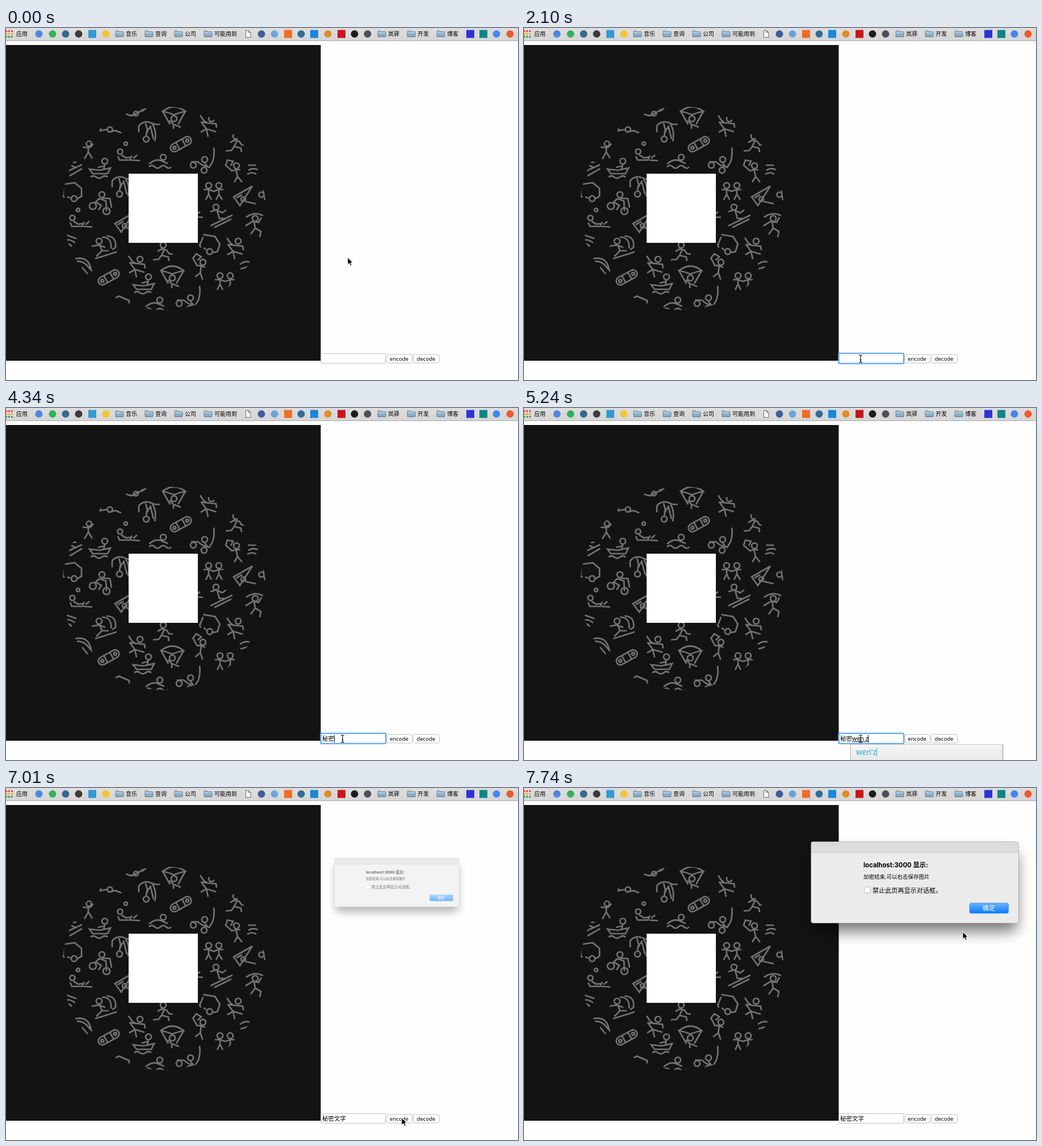
Recreate the animation shown at these times as an HTML page. Size 902 by 621 pixels, loop 8000 ms.

```html
<!DOCTYPE html>
<html lang="zh">
<head>
<meta charset="utf-8">
<style>
html, body { margin: 0; width: 100%; height: 100%; overflow: hidden; background: #fefefe; }
svg { display: block; width: 902px; height: 621px; }
text { font-family: "Noto Sans", "Noto Sans CJK SC", "Noto Sans CJK", sans-serif; white-space: pre; }
</style>
</head>
<body>
<svg viewBox="0 0 902 621">
  <defs>
    <linearGradient id="bar" x2="0" y2="1"><stop stop-color="#dedede"/><stop offset="1" stop-color="#d5d5d5"/></linearGradient>
    <linearGradient id="popFill" x2="0" y2="1"><stop stop-color="#f6f6f6"/><stop offset="1" stop-color="#e2e2e2"/></linearGradient>
    <linearGradient id="blue" x2="0" y2="1"><stop stop-color="#6bb3fa"/><stop offset="1" stop-color="#0a7bfd"/></linearGradient>
    <linearGradient id="folderFill" x2="0" y2="1"><stop stop-color="#a5c4d8"/><stop offset="1" stop-color="#7fa4be"/></linearGradient>
    <clipPath id="disc"><circle cx="278" cy="318" r="179.5"/></clipPath>
    <filter id="blur" x="-30%" y="-50%" width="160%" height="200%"><feGaussianBlur stdDeviation="12"/></filter>
    <g id="folder">
      <path d="M-7-4q0-1 1-1h4l1 1.5h7q1 0 1 1V4.500q0 1-1 1H-6q-1 0-1-1Z" fill="url(#folderFill)" stroke="#54778f" stroke-width=".9"/>
      <path d="M-6.500-2H6.500" stroke="#c6dbe8"/>
    </g>
  </defs>

  <rect width="902" height="22" fill="url(#bar)"/>
  <rect y="22" width="902" height="1" fill="#a9a9a9"/>
  <g id="bookmarks"></g>

  <rect y="30" width="554.500" height="557" fill="#131313"/>
  <g id="sports" clip-path="url(#disc)" fill="none" stroke="#737373" stroke-width="2.700"></g>
  <rect x="216" y="257" width="122" height="122" fill="#fff"/>

  <rect id="field" x="555" y="574.500" width="113.500" height="17" fill="#fff" stroke="#c3c3c3"/>
  <rect id="ring" x="554.500" y="574" width="114.500" height="18" rx="1.500" fill="none" stroke="#6cadec" stroke-width="2.400"/>
  <text id="typed" x="557" y="587" font-size="10.500"></text>
  <path id="underline" stroke="#222"/>
  <path id="caret" stroke="#000"/>
  <g id="buttons" font-size="9.600" text-anchor="middle"></g>

  <g id="popup">
    <rect id="popShadow" y="593" height="40" fill="#000" opacity=".16"/>
    <rect id="popBox" y="593.500" height="40" fill="url(#popFill)" stroke="#c4c4c4"/>
    <text id="pinyin" y="612" font-size="13.500" fill="#27a7dd"></text>
    <path id="pinCaret" stroke="#27a7dd"/>
  </g>

  <g id="dialog">
    <rect x="508" y="113" width="361" height="141" rx="12" fill="#000" opacity=".5" filter="url(#blur)"/>
    <rect x="505.500" y="94.500" width="366" height="144" rx="4" fill="#ebebeb" stroke="#000" stroke-opacity=".2"/>
    <path d="M506 113.500V99q0-4 4-4H867q4 0 4 4v14.500Z" fill="#dcdcdc"/>
    <path d="M506 113.500H871" stroke="#c2c2c2"/>
    <text x="598" y="140" font-size="11.300" font-weight="700" style="font-family:Inter,'Noto Sans CJK SC','Noto Sans CJK',sans-serif">localhost:3000 显示:</text>
    <text x="598" y="159.500" font-size="9.500">加密结束,可以右击保存图片</text>
    <rect x="599.500" y="174.500" width="11" height="11" rx="2" fill="#fff" stroke="#b5b5b5"/>
    <text x="614" y="184.500" font-size="11.100">禁止此页再显示对话框。</text>
    <rect x="785" y="203" width="68.500" height="18" rx="3" fill="url(#blue)" stroke="#2f86e8" stroke-width=".7"/>
    <text x="819" y="216" font-size="11.100" fill="#fff" text-anchor="middle">确定</text>
  </g>

  <path id="arrow" d="M0 0V12.500L3 9.800 5 14.300 7.200 13.300 5.200 9H9Z" fill="#000" stroke="#fff" stroke-width=".9"/>
  <path id="beam" d="M-3-6.500Q0-6.500 0-4.500Q0-6.500 3-6.500M0-5V5M-3 6.500Q0 6.500 0 4.500Q0 6.500 3 6.500M-1.500 2H1.500" fill="none" stroke="#111" stroke-width="1.200"/>
</svg>
<script>
const el = id => document.getElementById(id);
const set = (id, attrs) => { for (const k in attrs) el(id).setAttribute(k, attrs[k]); };
const show = (id, on) => { el(id).style.display = on ? '' : 'none'; };

// Bookmark bar
let bar = '';
['#e8453c', '#f5a623', '#3b9b55'].forEach((color, row) => {
  for (let col = 0; col < 3; col++)
    bar += `<rect x="${col * 5 - 1}" y="${row * 5 + 4}" width="3" height="3" fill="${color}"/>`;
});
const label = (x, s) => `<text x="${x}" y="14" font-size="10">${s}</text>`;
bar += label(18, '应用');
const folders = { 200: '音乐', 252: '查询', 304: '公司', 356: '可能用到', 662: '岚驿', 714: '开发', 766: '博客' };
for (const x in folders) bar += `<use href="#folder" x="${x}" y="10"/>` + label(+x + 11, folders[x]);
const dots = { 58: '#4d88e0', 82: '#30b457', 105: '#35688b', 128: '#3b3b3b', 176: '#f2c530', 450: '#3f5d9f',
  473: '#69a5dc', 520: '#326d95', 567: '#e08c28', 614: '#1c1c1c', 637: '#4b4f58', 864: '#4285f4', 888: '#ee5a2b' };
const squares = { 152: '#2f9bd6', 497: '#f36b23', 543: '#1688dc', 591: '#c5161d', 818: '#2b34da', 841: '#0c8584' };
for (const x in dots) bar += `<circle cx="${x}" cy="10.5" r="6.500" fill="${dots[x]}"/>`;
for (const x in squares) bar += `<rect x="${x - 7}" y="3.500" width="14" height="14" fill="${squares[x]}"/>`;
bar += '<path d="M422.500 4.500h5l3.500 3.500v8.500h-8.500ZM427.500 4.500V8H431" fill="#fff" stroke="#666"/>';
el('bookmarks').innerHTML = bar;

el('buttons').innerHTML = [[670, 45, 'encode'], [717, 46, 'decode']].map(([x, w, s]) =>
  `<rect id="${s}" x="${x + .5}" y="576" width="${w}" height="15" rx="3.500" fill="#fff" stroke="#bdbdbd"/>
   <text x="${x + w / 2}" y="587">${s}</text>`).join('');

// Pictograms: [path, 'x y [angle]', ...]; "Ox y r" is a ring
const sports = [
  ['O1 -11 4.5M-10-5L-3-4 4-5 9-11M0-5V4L-7 16M0 4L7 15', '145 215'],
  ['M-20-11Q0-27 20-11Q10-9 0-5Q-10-9-20-11L-7 12M20-11L7 12O0 2 5M-8 5L-1 12V20M-1 12L12 17', '296 158', '293 439'],
  ['O5 -12 5M-15-18L-9-9-2-4M-14-6L13-3 14 4M-13-6L-4 6-1 20M-4 6L13 11M-14 12L-4 6', '357 172', '231 420', '404 388'],
  ['O6 -8 5M-19 4Q-8-6 2-2L14 3M-19 9q5-5 10 0t10 0 10 0 9 0', '271 236', '265 488'],
  ['M-18 2V-9Q-12-18 0-16L10-12H19M-6-14L-2 2M6-12Q14 0 10 18M2-10L8 14O-5 14 5M-5 9L-4 0 3-8', '252 182', '205 279'],
  ['M-13-7H13a7 7 0 0 1 0 14H-13a7 7 0 0 1 0-14ZM-6-7V7M6-7V7O-13 0 2.500O13 0 2.500', '308 205 -29', '181 440 -29'],
  ['O0 -11 5M-10 0L-3-4 6-2 10 4 17 5M2-3L-3 7 9 10 10 17M-3 7L-8 14-18 15', '405 202', '277 394'],
  ['O-13 -2 4.5O-3 -16 3M-17 6L-14 13H4L8 5M-11 4L-3 9 6 8M6 13L22 14M10 10L17 4', '214 220', '130 337', '325 320'],
  ['O9 -12 5M9-7L7 3M9-4L-3-1M-18 2L-12 10H14L19 0 0 4ZM-16 16q5-4 10 0t10 0 10 0', '165 247', '242 451'],
  ['O4 -2 5O3 17 5O-16 8 5M-20 2H-8L0 8 12 12 18 2Q22-10 20-23M4 4L10 12', '346 234', '321 478'],
  ['O2 -9 5M1-3L4 10-2 20M4 10L12 20M1-2L-6 0-17-10-14-19-4-17-8-9M1-2H9', '404 252', '342 421 20'],
  ['M-9-8H9M-8 1q8-5 17-1M-10 8q9-5 16 0', '435 250', '113 376 20'],
  ['M-17-12L4-15 16-5V9L9 13M-16-8L-17 8-14 11M-4 12L-9 10O3 13 5', '117 288', '360 381 18'],
  ['O1 -15 5O-15 5 6O9 14 6M-4-8L-10-2 0 4-5 12M1-9L15-8 18 8M-4-8L8-4 9 14', '168 309'],
  ['O-9 -9 5O9 -9 5M-18-2H-9L0 1 9-2H17M-9-2V6L-14 16M-9 6L-4 16M9-2V6L4 16M9 6L15 16', '366 287', '386 446'],
  ['M-19 0L14-19-8 15ZM-14 2L-4-4O-2 4 4M2 8L20 12', '420 298', '211 345'],
  ['O-9 -14 5M-19-6L-9-9 2-4 9-9M-7-8L-3 6H9M-19 19L20 0M-12 22L18 7', '379 330'],
  ['O2 -11 5M-15 2L-2-6 8-4 13-13M0-6L2 6-6 17M2 6L12 12 10 22M-14-13Q0-24 16-16', '437 347'],
  ['O-9 -11 5M-22-2L-10-4 2 0M-8-5L-4 6-14 16M-4 6H8M-16 20L22 8M4-20Q22-20 20 0L14 4M-4-18Q14-18 12 2', '173 387'],
  ['O0 0 4M-18 0Q-8 7 0 0L18-9M10-9L13-4', '229 151'],
  ['O0 0 4.5M-14-12L-17 2-5 0M-3 5L10 2 20 6', '183 179'],
  ['M-14 7L14-6M-8 14L14 1M-6-5L4 0M-4-10H4', '120 247'],
  ['O0 0 4.5M4-8L6 10', '450 294'],
  ['M-14-11Q10-16 14 9L6 0Q-2-8-14-6M-2 4L8 16', '136 418'],
  ['M-9-1Q0-8 8-5M-8 7L6 3', '421 418'],
  ['M-12-2L-6-5 12 3V8', '205 478'],
];
const ring = (_, x, y, r) => `M${x - r} ${y}a${r} ${r} 0 1 0 ${2 * r} 0a${r} ${r} 0 1 0 ${-2 * r} 0`;
el('sports').innerHTML = sports.map(([shape, ...places]) => {
  const d = shape.replace(/O(\S+) (\S+) ([\d.]+)/g, ring);
  return places.map(p => {
    const [x, y, angle = 0] = p.split(' ');
    return `<path d="${d}" transform="translate(${x} ${y}) rotate(${angle})"/>`;
  }).join('');
}).join('');

// Timelines: each entry holds until the next one
const cursor = [[0, 602, 405], [1050, 604, 436], [1200, 601, 492], [1350, 596, 545], [1500, 593, 576, 'beam'],
  [1650, 593, 583.500, 'beam'], [6130, 644, 588, 'beam'], [6280, 671, 598], [6430, 688, 594], [6580, 697, 584],
  [7010, 697, 582], [7160, 701, 556], [7310, 718, 464], [7460, 744, 352], [7600, 766, 275], [7740, 773, 254]];
// time, committed text, composing text, pinyin, popup right edge, popup opacity
const typing = [[0, '', ''], [3440, '', 'm', 'mi', 763, 1], [3590, '', 'mi m', "mi'm", 862, 1],
  [3740, '', 'mi mi', "mi'mi", 862, 1], [4190, '秘密', '', "mi'mi", 862, .4], [4340, '秘密', ''],
  [4790, '秘密', 'w', 'w', 865, 1], [4940, '秘密', 'we', 'we', 865, 1], [5090, '秘密', 'wen', 'wen', 865, 1],
  [5240, '秘密', 'wen z', "wen'z", 843, 1], [5380, '秘密', 'wen zi', "wen'zi", 843, 1], [5680, '秘密文字', '']];
const caretOn = [[0, 0], [1650, 1], [2100, 0], [2550, 1], [3000, 0], [3440, 1], [6130, 0]];
const dialog = [[0, 0, 0], [7010, .6, .55], [7160, 1, 1]];
const at = (list, t) => list.findLast(step => step[0] <= t);

function draw(t) {
  const [, x, y, kind = 'arrow'] = at(cursor, t);
  for (const id of ['arrow', 'beam']) show(id, id === kind);
  set(kind, { transform: `translate(${x} ${y})` });

  const [, done, composing, pinyin, right, alpha] = at(typing, t);
  const typed = el('typed');
  typed.textContent = done;
  const start = 557 + (done ? typed.getComputedTextLength() : 0);
  typed.textContent = done + composing;
  const end = 557 + (done + composing ? typed.getComputedTextLength() : 0);
  set('underline', { d: composing ? `M${start} 588.500H${end}` : '' });
  set('caret', { d: `M${Math.round(end) + .5} 577V590` });
  show('caret', at(caretOn, t)[1]);
  show('ring', t >= 1650 && t < 6580);
  set('encode', { fill: t >= 6580 && t < 6720 ? '#d8d8d8' : '#fff' });

  show('popup', pinyin);
  if (pinyin) {
    const left = done && composing ? 575 : 555;
    set('popup', { opacity: alpha });
    set('popShadow', { x: left - 1, width: right - left + 3 });
    set('popBox', { x: left + .5, width: right - left - 1 });
    set('pinyin', { x: left + 10 });
    el('pinyin').textContent = pinyin;
    set('pinCaret', { d: `M${Math.round(left + 10 + el('pinyin').getComputedTextLength()) + .5} 599V614` });
  }

  const [, scale, opacity] = at(dialog, t);
  show('dialog', scale);
  set('dialog', { opacity, transform: `translate(688.500 166.500) scale(${scale}) translate(-688.500 -166.500)` });
}

function tick() {
  draw(performance.now() % 8000);
  requestAnimationFrame(tick);
}
tick();
</script>
</body>
</html>
```
